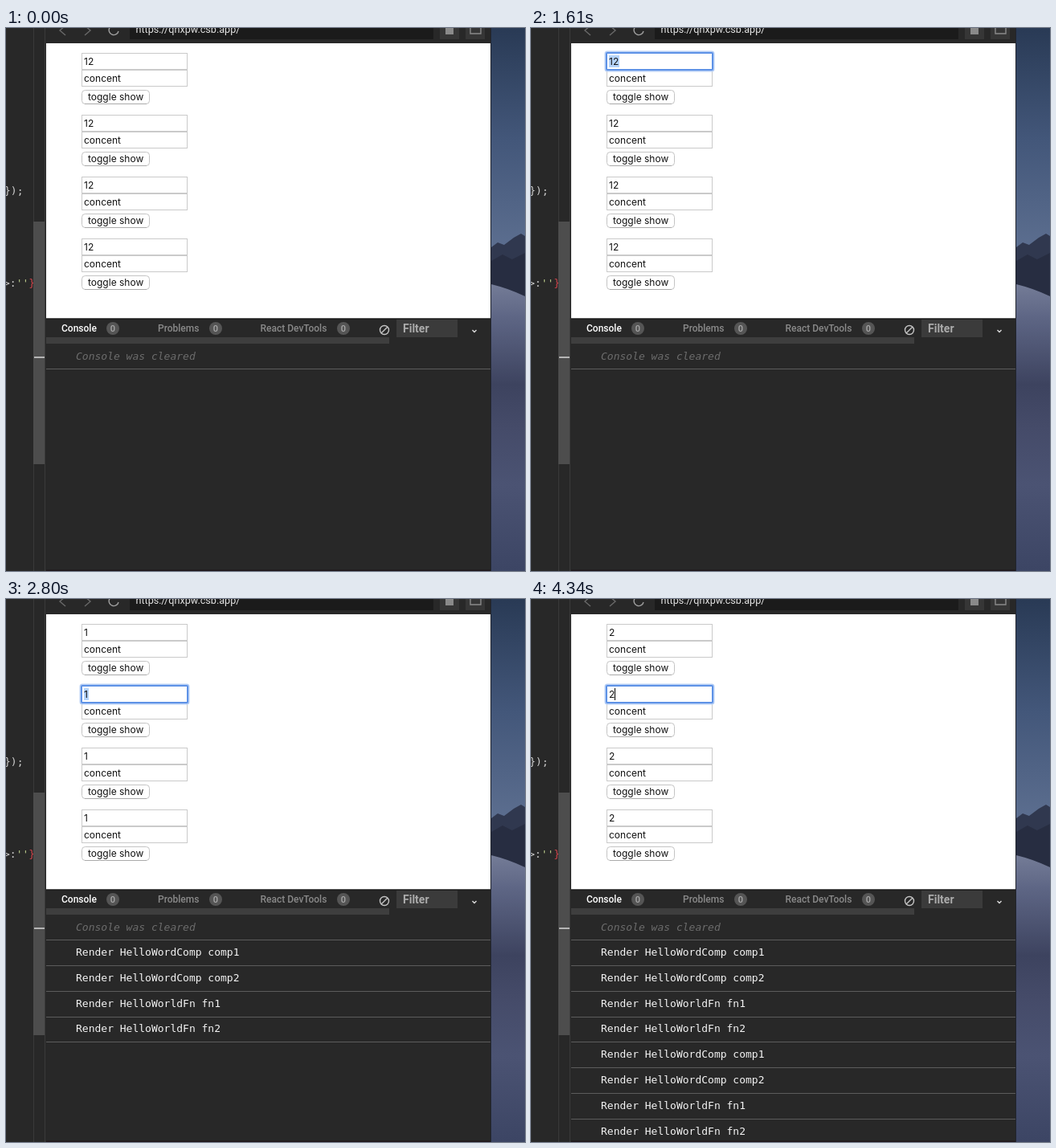
Animation, 646 px wide and 676 px high, one loop 4.41 s. Source, as an HTML page:

```html
<!DOCTYPE html>
<html lang="en">
<head>
<meta charset="utf-8">
<title>Shared state demo</title>
<style>
html, body { margin: 0; width: 100%; height: 100%; overflow: hidden; background: #282828; }
svg { display: block; }
text { white-space: pre; }
.ui { font: 500 12px Roboto, sans-serif; fill: #8a8a8a; }
.page { font: 12px Inter, sans-serif; fill: #111; }
.mono { font: 13px "DejaVu Sans Mono", monospace; fill: #f4f4f4; }
.line { fill: none; stroke: #686868; stroke-width: 1.4; }
.box { fill: #fff; stroke: #cacaca; }
</style>
</head>
<body>
<svg width="646" height="676" viewBox="0 0 646 676">
  <defs>
    <linearGradient id="sky" x2="0" y2="1">
      <stop stop-color="#293a55"/><stop offset=".5" stop-color="#43577a"/><stop offset="1" stop-color="#5d6f90"/>
    </linearGradient>
    <linearGradient id="dune" x2="0" y2="1">
      <stop stop-color="#747c97"/><stop offset=".12" stop-color="#5d6584"/><stop offset=".35" stop-color="#3d435f"/>
      <stop offset=".5" stop-color="#454b69"/><stop offset=".7" stop-color="#4b5373"/><stop offset="1" stop-color="#3c4564"/>
    </linearGradient>
  </defs>

  <!-- desktop -->
  <rect x="604" width="42" height="280" fill="url(#sky)"/>
  <path d="M604 273L612 267 620 270 632 261 641 256 646 259V340H604z" fill="#30384f"/>
  <path d="M604 290L618 282 630 288 646 280V340H604z" fill="#272d41"/>
  <path d="M604 319Q625 324 646 334V676H604z" fill="url(#dune)"/>

  <!-- editor -->
  <text class="mono" x="-2" y="207" style="fill:#d0d0d0">});</text>
  <text class="mono" x="-3" y="322" style="fill:#d0d0d0">>:<tspan fill="#b9c98a">''</tspan><tspan fill="#d4454c">}</tspan></text>
  <path d="M34 0h16v676H34z" fill="#282828"/>
  <path d="M34.5 0V676M48.5 0V676" stroke="#3a3a3a"/>
  <path d="M34 241h14v302H34z" fill="#4d4d4d"/>
  <path d="M35 410h13" stroke="#b5b5b5" stroke-width="2"/>

  <!-- browser bar -->
  <path d="M50 0H604V676H50z" fill="#282828"/>
  <path d="M154 0H532V14H154z" fill="#1b1b1b"/>
  <path d="M540 0h24v14h-24zM572 0h24v14h-24z" fill="#363636"/>
  <g class="line">
    <path d="M74 -3L67 3 74 9M98 -3L105 3 98 9"/>
    <path d="M140 4A6 6 0 1 1 138 -2" stroke="#a0a0a0"/>
    <path d="M578 0V7H591V0" stroke="#8a8a8a"/>
  </g>
  <path d="M547 -2h10v10h-10z" fill="#8a8a8a"/>
  <text class="ui" x="161.500" y="6" style="font-size:12.600px;font-weight:400;fill:#e4e4e4">https://qhxpw.csb.app/</text>
  <path id="mark" d="M144 18.500h10" stroke="#bbb"/>

  <path d="M50 19H604V361.500H50z" fill="#fff"/>
  <g id="forms"></g>

  <!-- console -->
  <path d="M50 361.500H604V363H50z" fill="#1d1d1d"/>
  <path d="M50 385H477V393H50z" fill="#3e3e3e"/>
  <g id="tabs"></g>
  <circle cx="471" cy="376" r="5.500" class="line" style="stroke:#c4c4c4"/>
  <path d="M467 380L475 372" class="line" style="stroke:#c4c4c4"/>
  <path d="M486 363h76v22h-76z" fill="#3b3b3b"/>
  <text class="ui" x="494" y="379" style="font-size:14px;font-weight:700;fill:#ababab">Filter</text>
  <path d="M580.500 376L583 378.500 585.500 376" class="line" style="stroke:#ddd"/>
  <text class="mono" x="87" y="413" style="font-style:italic;fill:#6c6c6c">Console was cleared</text>
  <path d="M50 424.500H604" stroke="#5c5c5c"/>
  <g id="logs"></g>
  <path d="M50 674.500H604V676H50z" fill="#1e161b"/>
  <path d="M603.500 0V676" stroke="#20242e"/>
</svg>
<script>
const LOOP = 4410;
const $ = id => document.getElementById(id);
const within = (t, spans) => spans.some(([a, b]) => t >= a && t < b);
const show = (el, on) => el.setAttribute("visibility", on ? "visible" : "hidden");

// Four linked forms, 77px apart
$("forms").innerHTML = [0, 1, 2, 3].map(i => `
  <g class="page" transform="translate(0 ${i * 77})">
    <rect class="box" x="94.500" y="52.500" width="131" height="20"/>
    <text x="97" y="67">concent</text>
    <rect class="box" x="94.500" y="31.500" width="131" height="20"/>
    <g class="ring" fill="none">
      <rect x="93" y="30" width="134" height="23" rx="2" stroke="#b4cdf5" stroke-width="3"/>
      <rect x="94" y="31" width="132" height="21" rx="1" stroke="#5e92e6" stroke-width="2"/>
    </g>
    <rect class="sel" x="97" y="34" height="15" fill="#b5d4fb"/>
    <text class="val" x="97" y="46"></text>
    <rect class="caret" y="34" width="1" height="15" fill="#000"/>
    <rect x="94.500" y="77.500" width="84" height="17" rx="4" fill="#fff" stroke="#c4c4c4"/>
    <path d="M98 94.500H175" stroke="#aaa"/>
    <text x="102" y="90">toggle show</text>
  </g>`).join("");

$("tabs").innerHTML = [["Console", 69, 133], ["Problems", 189, 261], ["React DevTools", 316.5, 420]]
  .map(([name, x, cx], i) => `
    <text class="ui" x="${x}" y="378" ${i ? "" : 'style="fill:#fff"'}>${name}</text>
    <circle cx="${cx}" cy="374" r="8" fill="#555"/>
    <text class="ui" x="${cx}" y="378" text-anchor="middle" style="font-size:11px;fill:#aaa">0</text>`).join("");

const names = ["HelloWordComp comp1", "HelloWordComp comp2", "HelloWorldFn fn1", "HelloWorldFn fn2"];
$("logs").innerHTML = [...names, ...names].map((name, i) => {
  const y = Math.round(424 + i * 31.8);
  return `<g><text class="mono" x="87" y="${y + 20}">Render ${name}</text>
    <path d="M50 ${Math.round(456 + i * 31.8) + 0.5}H604" stroke="#5c5c5c"/></g>`;
}).join("");

const forms = [...$("forms").children].map(form => {
  const part = name => form.querySelector("." + name);
  return { ring: part("ring"), sel: part("sel"), val: part("val"), caret: part("caret") };
});
const logs = [...$("logs").children];
const ends = { 12: 110, 1: 103, 2: 104 };

function draw(now) {
  const t = now % LOOP;
  const value = t < 1680 ? "12" : t < 3080 ? "1" : "2";
  const focus = t < 1260 ? -1 : t < 2520 ? 0 : 1;
  const selected = within(t, [[1400, 1680], [2590, 3080]]);
  const caret = within(t, [[1260, 1400], [1680, 2170], [2520, 2590], [3080, 3570], [4130, LOOP]]);
  const count = t < 1680 ? 0 : t < 3080 ? 4 : 8;

  forms.forEach((f, i) => {
    f.val.textContent = value;
    f.sel.setAttribute("width", ends[value] - 97);
    f.caret.setAttribute("x", ends[value]);
    show(f.ring, i === focus);
    show(f.sel, i === focus && selected);
    show(f.caret, i === focus && caret);
  });
  logs.forEach((row, i) => show(row, i < count));
  show($("mark"), within(t, [[2380, 2520]]));
  requestAnimationFrame(draw);
}
draw(performance.now());
</script>
</body>
</html>
```
